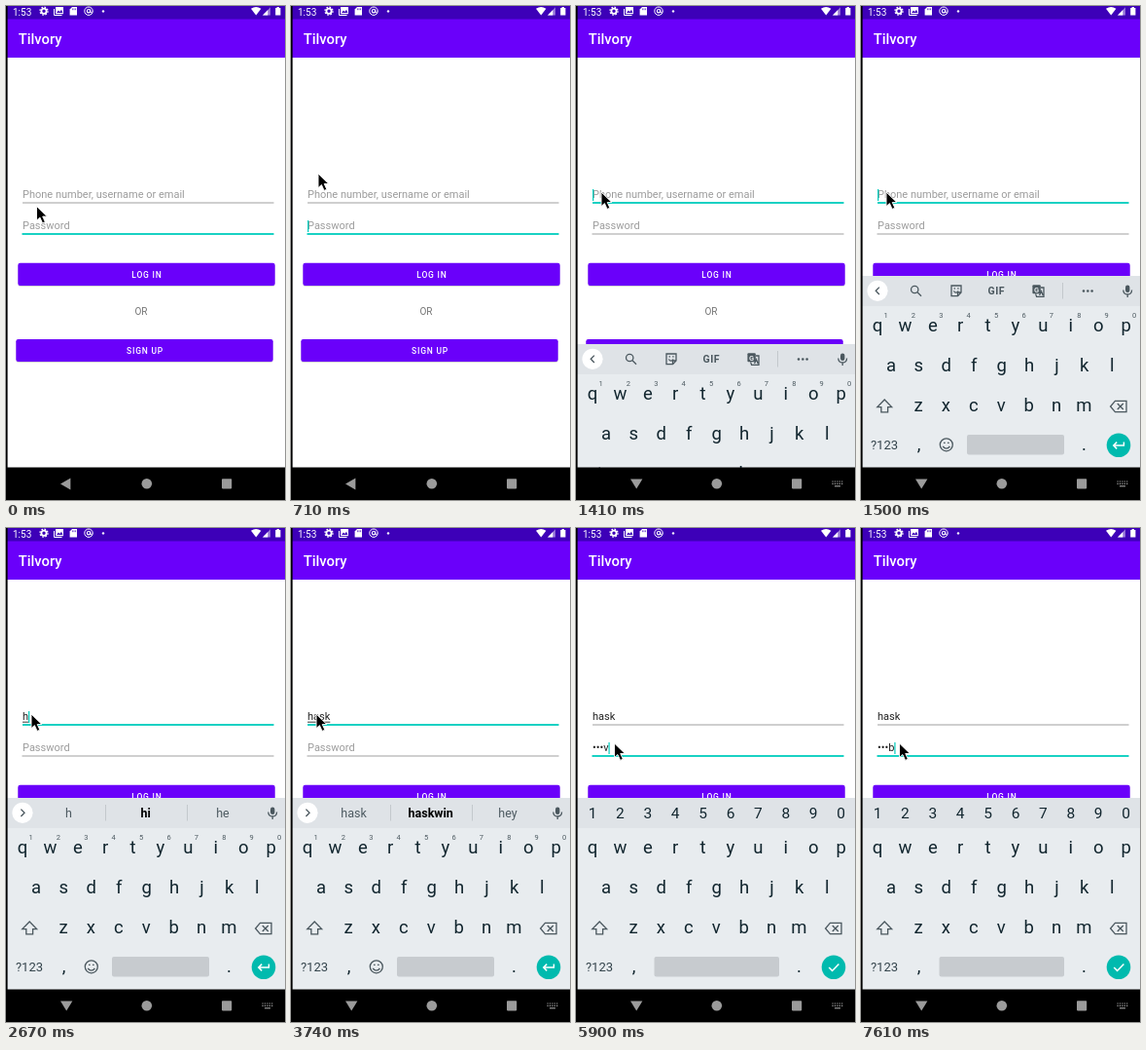
These frames come from a looping animation (287 px wide and 507 px high, 8 s). An HTML page:

```html
<!DOCTYPE html>
<html lang="en">
<head>
<meta charset="utf-8">
<title>Log in</title>
<style>
  html, body { margin: 0; width: 100%; height: 100%; overflow: hidden; background: #fff; }
  svg { display: block; width: 287px; height: 507px; font-family: Roboto, sans-serif; }
  .mid { text-anchor: middle; }
  .hint { font-size: 11px; fill: #9c9c9c; }
  .typed { font-size: 11px; fill: #222; }
  .btn { font-size: 8.5px; font-weight: 500; letter-spacing: .76px; fill: #fff; }
  .key { font-size: 18.5px; fill: #12262f; text-anchor: middle; }
  .num { font-size: 15.5px; fill: #12262f; text-anchor: middle; }
  .sup { font-size: 7.5px; fill: #4d5a61; text-anchor: middle; }
  .sug { font-size: 12.5px; fill: #4d5a61; text-anchor: middle; }
  .best { font-weight: 700; fill: #000; }
  .icon { fill: none; stroke: #4a575e; stroke-width: 1.3; }
  .off { display: none; }
</style>
</head>
<body>
<svg viewBox="0 0 287 507">
  <rect width="287" height="507" fill="#fff"/>

  <rect y="13" width="287" height="40" fill="#6a00fa"/>
  <rect width="287" height="13.5" fill="#3d00b8"/>
  <text x="7" y="9.6" font-size="10" fill="#fff">1:53</text>
  <g fill="none" stroke="#fff">
    <circle cx="39" cy="5.2" r="2.6" stroke-width="1.8"/>
    <circle cx="39" cy="5.2" r="4" stroke-width="1.3" stroke-dasharray="1.6 1.54"/>
    <path d="M49.5 3V9.5H57.5" stroke-width="1"/>
    <circle cx="85" cy="5.2" r="4.2" stroke-width="1"/>
    <circle cx="85" cy="5.2" r="1.7" stroke-width="1.1"/>
    <path d="M86.7 3.5V6.5Q88 7.5 89 5.5" stroke-width=".9"/>
  </g>
  <g fill="#fff">
    <path d="M51 1h8v7.2h-8z"/>
    <path d="M52 7l2-2.6 1.4 1.6 1.6-2.2 1.4 3.2z" fill="#3d00b8"/>
    <path d="M68 1h5v8.6h-7.4V3.4z"/>
    <path d="M68.4 2.4v1.8M70 2.4v1.8M71.6 2.4v1.8" stroke="#3d00b8" stroke-width=".7"/>
    <circle cx="100" cy="5.4" r="1.2"/>
    <path d="M252 2.8Q257.2-.8 262.4 2.8L257.2 9.4z"/>
    <path d="M264 9.4L272 1.2V9.4z" fill-opacity=".45"/>
    <path d="M264 9.4L269.4 4V9.4z"/>
    <path d="M277.2 2h1.4V1h2.4v1h1.4v7.6h-5.2z"/>
  </g>
  <text x="12.8" y="38.8" font-size="14.8" font-weight="500" fill="#fff">Tilvory</text>

  <text id="userHint" class="hint" x="17" y="196.8">Phone number, username or email</text>
  <text id="user" class="typed" x="17" y="196.8"></text>
  <path id="compose" stroke="#222" stroke-width=".9"/>
  <rect id="userLine" x="17" width="258.5"/>
  <rect id="userCaret" y="188" width="1.2" height="12" fill="#00cdbd"/>
  <text id="passHint" class="hint" x="17" y="229">Password</text>
  <text id="pass" class="typed" x="17" y="229"></text>
  <rect id="passLine" x="16.5" width="259"/>
  <rect id="passCaret" y="220" width="1.2" height="12" fill="#00cdbd"/>

  <g fill="#000" fill-opacity=".16">
    <rect x="12.5" y="264.6" width="264" height="23.4" rx="2.5"/>
    <rect x="10.5" y="342.8" width="264" height="23.2" rx="2.5"/>
  </g>
  <g fill="#6a00fa">
    <rect x="12.3" y="263.8" width="264.4" height="23.2" rx="2.3"/>
    <rect x="10.3" y="342" width="264.4" height="23" rx="2.3"/>
  </g>
  <text class="btn mid" x="144.9" y="278.6">LOG IN</text>
  <text class="mid" x="139" y="316.6" font-size="10" fill="#757575">OR</text>
  <text class="btn mid" x="143" y="356.8">SIGN UP</text>

  <g id="board">
    <rect y="277" width="287" height="197" fill="#e8ecef"/>
    <rect y="277" width="287" height="31" fill="#dfe3e7"/>

    <g id="strip">
      <circle cx="17" cy="292.3" r="10.6" fill="#fff"/>
      <path id="chevron" class="icon"/>
      <rect x="272" y="286.6" width="4.4" height="7.4" rx="2.2" fill="#4a575e"/>
      <path class="icon" d="M269.8 291.5Q270 296 274.2 296T278.6 291.5M274.2 296v3"/>
    </g>
    <g id="tools">
      <circle class="icon" cx="55.2" cy="291" r="3.7"/>
      <path class="icon" d="M58 293.8L62 297.8" stroke-width="1.7"/>
      <path class="icon" d="M93 287h10v7l-3.4 3.6H93zM99.5 297.5V294H103M95.3 292.5q2.4 3.4 4.8 0"/>
      <path class="icon" d="M95.6 289.8h1.4M99.2 289.8h1.4"/>
      <text class="mid" x="139.3" y="296.2" font-size="10.5" font-weight="700" letter-spacing=".5" fill="#4a575e">GIF</text>
      <rect x="176.4" y="286.2" width="8.4" height="9" rx="1" fill="#4a575e"/>
      <path class="icon" d="M185 289h3v9.4h-7.4l-1-3M183.6 297l1.8-4.4 1.8 4.4"/>
      <text class="mid" x="180.6" y="293.6" font-size="7.5" font-weight="700" fill="#e8ecef">G</text>
      <path d="M207.5 284v16.5" stroke="#c3c8cc"/>
      <g fill="#4a575e"><circle cx="229" cy="292.5" r="1.3"/><circle cx="233.3" cy="292.5" r="1.3"/><circle cx="237.6" cy="292.5" r="1.3"/></g>
    </g>
    <g id="words">
      <path d="M102.5 284v16.5M186.5 284v16.5" stroke="#c3c8cc"/>
      <text class="sug" x="64.5" y="297"></text>
      <text class="sug best" x="143.7" y="297"></text>
      <text class="sug" x="223" y="297"></text>
    </g>

    <g id="sups"></g>
    <g id="digits"></g>
    <g id="keys"></g>

    <path class="icon" d="M24.2 404L31.6 411.6H27.6V416.8H20.8V411.6H16.8z"/>
    <path class="icon" d="M261.4 405.4H273V416.6H261.4L256.6 411zM263.8 408l6 6M269.8 408l-6 6"/>
    <text class="mid" x="24" y="455.2" font-size="13" fill="#33434b">?123</text>
    <g id="emoji">
      <circle class="icon" cx="87.8" cy="450.3" r="6.5"/>
      <path class="icon" d="M84.2 452q3.6 4.4 7.2 0M85 448.3h1.6M89 448.3h1.6"/>
    </g>
    <rect id="space" y="440" height="20.4" rx="2" fill="#c7cbcf"/>
    <circle cx="265" cy="450.8" r="12.3" fill="#00baae"/>
    <path id="action" fill="none" stroke="#fff" stroke-width="1.5"/>
  </g>

  <rect y="473.5" width="287" height="34" fill="#000"/>
  <g fill="#9b9b9b">
    <path id="back"/>
    <circle cx="144.8" cy="490.3" r="5.3"/>
    <rect x="222" y="485.2" width="10.2" height="10.2" rx=".8"/>
  </g>
  <g id="ime" stroke="#a8a8a8" stroke-width="1.1">
    <path d="M263.5 488h11M263.5 490.4h11" stroke-dasharray="1.2 1.2"/>
    <path d="M266 492.8h6"/>
  </g>
  <rect width="1.6" height="507" fill="#000"/>

  <path id="mouse" d="M0 0V14.6L3.4 11.5L6.1 17.4L8.8 16.2L6.2 10.5H10.8z" fill="#000" stroke="#fff" stroke-width=".9"/>
</svg>

<script>
const LOOP = 8000;
const $ = id => document.getElementById(id);
const show = (id, on) => $(id).classList.toggle('off', !on);
const within = (t, spans) => spans.some(([a, b]) => t >= a && t < b);
const set = (id, attrs) => Object.entries(attrs).forEach(([k, v]) => $(id).setAttribute(k, v));

// Latest entry whose start time has passed
const at = (t, list) => list.reduce((cur, step) => t >= step[0] ? step : cur);

function row(parent, chars, x, y, cls) {
  [...chars].forEach((c, i) => {
    const el = document.createElementNS('http://www.w3.org/2000/svg', 'text');
    el.setAttribute('x', x + i * 28.4);
    el.setAttribute('y', y);
    el.setAttribute('class', cls);
    el.textContent = c;
    $(parent).append(el);
  });
}
row('keys', 'qwertyuiop', 17, 334, 'key');
row('keys', 'asdfghjkl', 31, 375, 'key');
row('keys', 'zxcvbnm', 59, 416, 'key');
row('keys', ',', 59.5, 456, 'key');
row('keys', '.', 229.5, 456, 'key');
row('sups', '1234567890', 25.5, 320, 'sup');
row('digits', '1234567890', 17, 298, 'num');

const userSteps = [
  [0, '', '', '', ''],
  [2670, 'h', 'h', 'hi', 'he'],
  [2850, 'ha', 'ha', 'hat', 'had'],
  [3030, 'has', 'has', 'hash', 'hey'],
  [3290, 'hask', 'hask', 'haskwin', 'hey']
];
const passSteps = [
  [0, ''], [5360, 'n'], [5540, '•a'], [5720, '••t'],
  [5900, '•••v'], [6890, '•••'], [7610, '•••b']
];
const userBlink = [[1150, 1770], [2310, 3740], [4280, 4460]];
const passBlink = [[450, 970], [4550, 5090], [5360, 6440], [6890, 7340], [7610, LOOP]];

const mousePath = [
  [0, 31.5, 205.5], [270, 31, 199], [360, 31, 186], [450, 30, 174], [540, 29, 169.5],
  [630, 28, 172], [720, 27, 178], [790, 27, 184], [880, 26, 188], [970, 26, 191],
  [3920, 31, 194], [4010, 43, 203], [4100, 52, 214], [4190, 46, 220], [4280, 39.5, 221]
];

function line(id, y, focused) {
  set(id, focused
    ? { y: y - .9, height: 1.8, fill: '#00cdbd' }
    : { y: y - .5, height: 1, fill: '#a0a0a0' });
}

function field(id, text, caretOn) {
  const el = $(id);
  if (el.textContent !== text) el.textContent = text;
  const end = 17 + (text ? el.getComputedTextLength() : 0);
  show(id + 'Hint', !text);
  show(id + 'Caret', caretOn);
  set(id + 'Caret', { x: end });
  return end;
}

function render(t) {
  const [, name, ...words] = at(t, userSteps);
  const end = field('user', name, within(t, userBlink));
  field('pass', at(t, passSteps)[1], within(t, passBlink));
  set('compose', { d: `M17 199.2H${end}` });
  show('compose', name && t < 4460);
  line('userLine', 202, within(t, [[1150, 4460]]));
  line('passLine', 234, t < 1330 || t >= 4460);

  const open = t >= 1410, secret = t >= 4550;
  show('board', open);
  set('board', { transform: `translate(0 ${t < 1500 ? 70 : 0})` });
  show('strip', !secret);
  show('tools', !secret && !name);
  show('words', !secret && name);
  show('sups', !secret);
  show('digits', secret);
  show('emoji', !secret);
  $('words').querySelectorAll('text').forEach((el, i) => el.textContent = words[i]);
  set('chevron', { d: name ? 'M15.4 288.6L19 292.3L15.4 296' : 'M18.8 288.6L15.2 292.3L18.8 296' });
  set('space', secret ? { x: 80.5, width: 128.5 } : { x: 109, width: 100 });
  set('action', { d: secret
    ? 'M260.2 451L263.6 454.4L270.4 447.4'
    : 'M270.4 447.4V451H260M263.2 447.6L259.8 451L263.2 454.4' });

  set('back', { d: open ? 'M56 485.6H68.4L62.2 495.6z' : 'M66.4 484.4V496.4L56 490.4z' });
  show('ime', t >= 1330);

  const [, x, y] = at(t, mousePath);
  set('mouse', { transform: `translate(${x} ${y})` });
}

const start = performance.now();
function tick() {
  render((performance.now() - start) % LOOP);
  requestAnimationFrame(tick);
}
tick();
</script>
</body>
</html>
```
